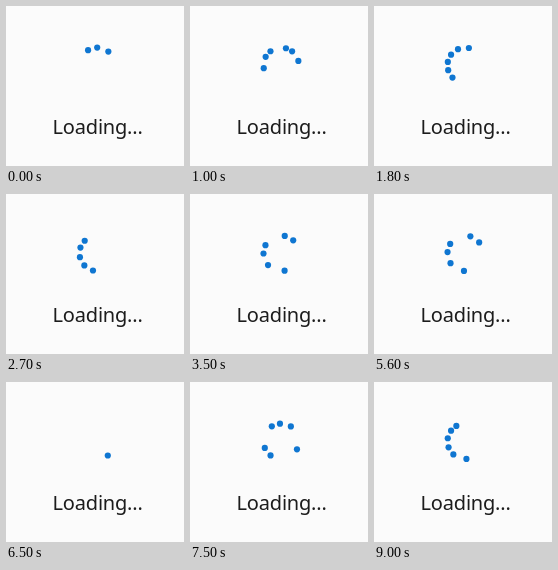
These frames come from a looping animation (178 px wide and 160 px high, 9.1 s). An HTML page:

```html
<!DOCTYPE html>
<html lang="en">
<head>
<meta charset="utf-8">
<title>Loading</title>
<style>
  html, body { margin: 0; width: 100%; height: 100%; overflow: hidden; background: #fbfbfb; }
  svg { display: block; width: 178px; height: 160px; }
  text { font: 20px "Noto Sans", "Open Sans", sans-serif; letter-spacing: -0.2px; fill: #1c1c1c; }
  circle { fill: #0f76d1; }
</style>
</head>
<body>
<svg viewBox="0 0 178 160">
  <g id="ring"></g>
  <text x="46.6" y="128">Loading...</text>
</svg>
<script>
const LOOP = 9100, STEP = 100;
const CYCLE = 2080, LEAD = 160, SHIFT = 4600;
const CX = 91.2, CY = 59.3, RADIUS = 17.7, DOT = 3.1, FADE = 15;

// One track per dot: [cycle time in ms, degrees clockwise from the top]
const tracks = [
  [[-160, -180], [0, -92], [240, -30], [500, 45], [820, 248], [1000, 302], [1360, 372], [1410, 394], [1550, 540]],
  [[-80, -180], [0, -133], [240, -53], [570, 42], [820, 217], [1000, 274], [1360, 336], [1460, 388], [1590, 534]],
  [[-3, -181], [240, -80], [650, 45], [820, 117], [1000, 236], [1360, 307], [1510, 382], [1630, 528]],
  [[80, -180], [240, -110], [820, 33], [1000, 184], [1100, 240], [1360, 281], [1640, 399], [1770, 522]],
  [[150, -182], [240, -138], [820, -4], [1000, 52], [1100, 184], [1360, 254], [1640, 360], [1840, 516]],
  [[220, -190], [240, -184], [820, -32], [1000, 17], [1070, 36], [1170, 170], [1360, 226], [1640, 329], [1910, 510]]
];

const slope = (a, b) => (b[1] - a[1]) / (b[0] - a[0]);

function tangent(keys, i) {
  if (i === 0) return slope(keys[0], keys[1]);
  if (i === keys.length - 1) return slope(keys[i - 1], keys[i]);
  const a = slope(keys[i - 1], keys[i]), b = slope(keys[i], keys[i + 1]);
  return 2 * a * b / (a + b);
}

// Smooth curve that never runs backwards
function angleAt(keys, t) {
  let i = 0;
  while (i < keys.length - 2 && t >= keys[i + 1][0]) i++;
  const [t0, a0] = keys[i], [t1, a1] = keys[i + 1];
  const h = t1 - t0, x = (t - t0) / h, y = 1 - x;
  return a0 * y * y * (1 + 2 * x) + a1 * x * x * (1 + 2 * y)
    + h * x * y * (y * tangent(keys, i) - x * tangent(keys, i + 1));
}

const ring = document.getElementById("ring");
const dots = tracks.map(() => {
  const dot = document.createElementNS("http://www.w3.org/2000/svg", "circle");
  dot.setAttribute("r", DOT);
  return ring.appendChild(dot);
});

function draw(time) {
  const raw = time - SHIFT + LEAD;
  const t = ((raw % CYCLE) + CYCLE) % CYCLE - LEAD;
  tracks.forEach((keys, i) => {
    const start = keys[0][0], end = keys[keys.length - 1][0];
    const shown = t >= start && t < end;
    dots[i].setAttribute("opacity", shown ? Math.min(1, (t - start) / FADE) : 0);
    if (!shown) return;
    const a = angleAt(keys, t) * Math.PI / 180;
    dots[i].setAttribute("cx", CX + RADIUS * Math.sin(a));
    dots[i].setAttribute("cy", CY - RADIUS * Math.cos(a));
  });
}

const begin = performance.now();
function tick() {
  const time = (performance.now() - begin) % LOOP;
  draw(Math.floor(time / STEP) * STEP);
  requestAnimationFrame(tick);
}
tick();
</script>
</body>
</html>
```
